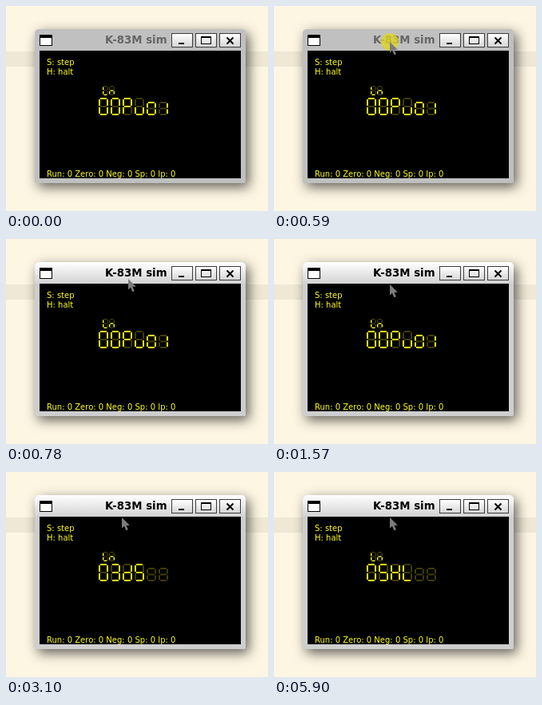
Animation of 328x257 px, one loop 8 s. Source, as an HTML page with a canvas:

```html
<!DOCTYPE html>
<html lang="en">
<head>
<meta charset="utf-8">
<title>Watch simulator</title>
<style>
  html, body { margin: 0; width: 100%; height: 100%; overflow: hidden; background: #fdf6e3; }
  canvas { display: block; }
</style>
</head>
<body>
<canvas id="stage" width="328" height="257"></canvas>
<script>
const ctx = document.getElementById('stage').getContext('2d');
const LOOP = 8000;
const LIT = '#ffff1e', DIM = '#413c07';

// Lit segments: a top, b/c right, d bottom, e/f left, g middle
const GLYPHS = {
  0: 'abcdef', 1: 'bc', 2: 'abged', 3: 'abgcd', 4: 'fgbc', 5: 'afgcd',
  P: 'abefg', u: 'cde', A: 'abcefg', d: 'bcdeg', S: 'afgcd',
  o: 'cdeg', H: 'bcefg', L: 'def', n: 'ceg', ' ': ''
};

const PROGRAM = [
  [0, '00Pu01'], [1870, '01Pu02'], [2340, '02Ad  '],
  [3100, '03dS  '], [4400, '04Po  '], [5900, '05HL  ']
];

const CLICK_PATH = [[145, 45], [145, 45], [145, 45], [147, 46], [151, 47], [153, 50], [149, 54], [146, 57]];

function rect(x, y, w, h, color) {
  ctx.fillStyle = color;
  ctx.fillRect(x, y, w, h);
}

function text(str, x, y, font, color) {
  ctx.font = font;
  ctx.fillStyle = color;
  ctx.fillText(str, x, y);
}

function path(points, close) {
  ctx.beginPath();
  points.forEach(([x, y]) => ctx.lineTo(x, y));
  if (close) ctx.closePath();
}

function line(color, width, ...points) {
  path(points);
  ctx.strokeStyle = color;
  ctx.lineWidth = width;
  ctx.stroke();
}

function gradient(top, bottom, from, to) {
  const g = ctx.createLinearGradient(0, top, 0, bottom);
  g.addColorStop(0, from);
  g.addColorStop(1, to);
  return g;
}

function digit(char, x, y, w, h, weight) {
  const half = weight / 2, gap = weight * 0.55;
  const l = x + half, r = x + w - half, t = y + half, b = y + h - half, m = (t + b) / 2;
  const across = v => [[l + gap, v], [r - gap, v]];
  const down = (u, from, to) => [[u, from + gap], [u, to - gap]];
  const segments = {
    a: across(t), g: across(m), d: across(b),
    f: down(l, t, m), e: down(l, m, b), b: down(r, t, m), c: down(r, m, b)
  };
  const lit = GLYPHS[char];
  for (const key in segments) {
    line(lit.includes(key) ? LIT : DIM, weight, ...segments[key]);
  }
}

function drawButton(x) {
  rect(x, 34, 27, 18, '#3c3c3c');
  rect(x + 1, 35, 25, 16, gradient(35, 51, '#ffffff', '#d6d6d6'));
}

function drawWindow(active) {
  ctx.save();
  ctx.shadowColor = 'rgba(0,0,0,.62)';
  ctx.shadowBlur = 15;
  ctx.shadowOffsetX = 4;
  ctx.shadowOffsetY = 5;
  ctx.fillStyle = active ? '#cecece' : '#c0c0c0';
  ctx.beginPath();
  ctx.roundRect(36, 29, 264, 193, [5, 5, 2, 2]);
  ctx.fill();
  ctx.restore();

  if (active) {
    ctx.fillStyle = gradient(29, 56, '#ffffff', '#d2d2d2');
    ctx.beginPath();
    ctx.roundRect(36, 29, 264, 27, [5, 5, 0, 0]);
    ctx.fill();
  }

  rect(42, 36, 16, 14, '#000');
  rect(43, 40, 14, 9, '#fff');
  text('K-83M sim', 124, 47, 'bold 13.333px "DejaVu Sans", sans-serif', active ? '#000' : '#666');

  [207, 237, 267].forEach(drawButton);
  rect(216, 46, 7, 2, '#000');
  ctx.strokeStyle = '#000';
  ctx.lineWidth = 1;
  ctx.strokeRect(244.5, 38.5, 12, 9);
  rect(244, 38, 13, 2, '#000');
  line('#000', 2, [276.5, 39.5], [284.5, 47.5]);
  line('#000', 2, [284.5, 39.5], [276.5, 47.5]);

  rect(42, 56, 252, 160, '#000');
}

function drawDisplay(t) {
  const font = '10px "DejaVu Sans", sans-serif';
  text('S: step', 51, 74, font, LIT);
  text('H: halt', 51, 86, font, LIT);
  text('Run: 0 Zero: 0 Neg: 0 Sp: 0 Ip: 0', 51, 214, font, LIT);

  digit('L', 121, 100, 7, 12, 1.4);
  digit('n', 129, 100, 7, 12, 1.4);

  const code = PROGRAM.findLast(([start]) => t >= start)[1];
  [...code].forEach((char, i) => {
    const top = i < 4 ? 115 : 120;
    digit(char, 116 + 15 * i, top, 12, 137 - top, 2);
  });
}

function cursorAt(t) {
  if (t < 100) return null;
  if (t < 590) {
    const p = Math.min(9, Math.floor((t - 100) / 38.8)) / 9;
    const left = (1 - p) ** 2;
    return [145 + 155 * left, 45 + 192 * left];
  }
  if (t >= 1570) return [145, 57];
  return CLICK_PATH[Math.min(7, Math.floor((t - 590) / 35.7))];
}

function drawCursor([x, y]) {
  ctx.save();
  ctx.translate(x, y);
  path([[0, 0], [0, 13.5], [3, 10.8], [5.4, 16.2], [7.8, 15.2], [5.5, 10], [9.8, 9.8]], true);
  ctx.fillStyle = '#7c7c7c';
  ctx.fill();
  ctx.restore();
}

function draw(t) {
  rect(0, 0, 328, 257, '#fdf6e3');
  rect(0, 57, 328, 19, '#eee8d5');
  drawWindow(t >= 620);
  drawDisplay(t);

  if (t >= 590 && t < 700) {
    ctx.fillStyle = 'rgba(222,214,30,.76)';
    ctx.beginPath();
    ctx.arc(145, 45, 11, 0, Math.PI * 2);
    ctx.fill();
  }
  const cursor = cursorAt(t);
  if (cursor) drawCursor(cursor);
}

const started = performance.now();
function tick() {
  draw((performance.now() - started) % LOOP);
  requestAnimationFrame(tick);
}
tick();
</script>
</body>
</html>
```
